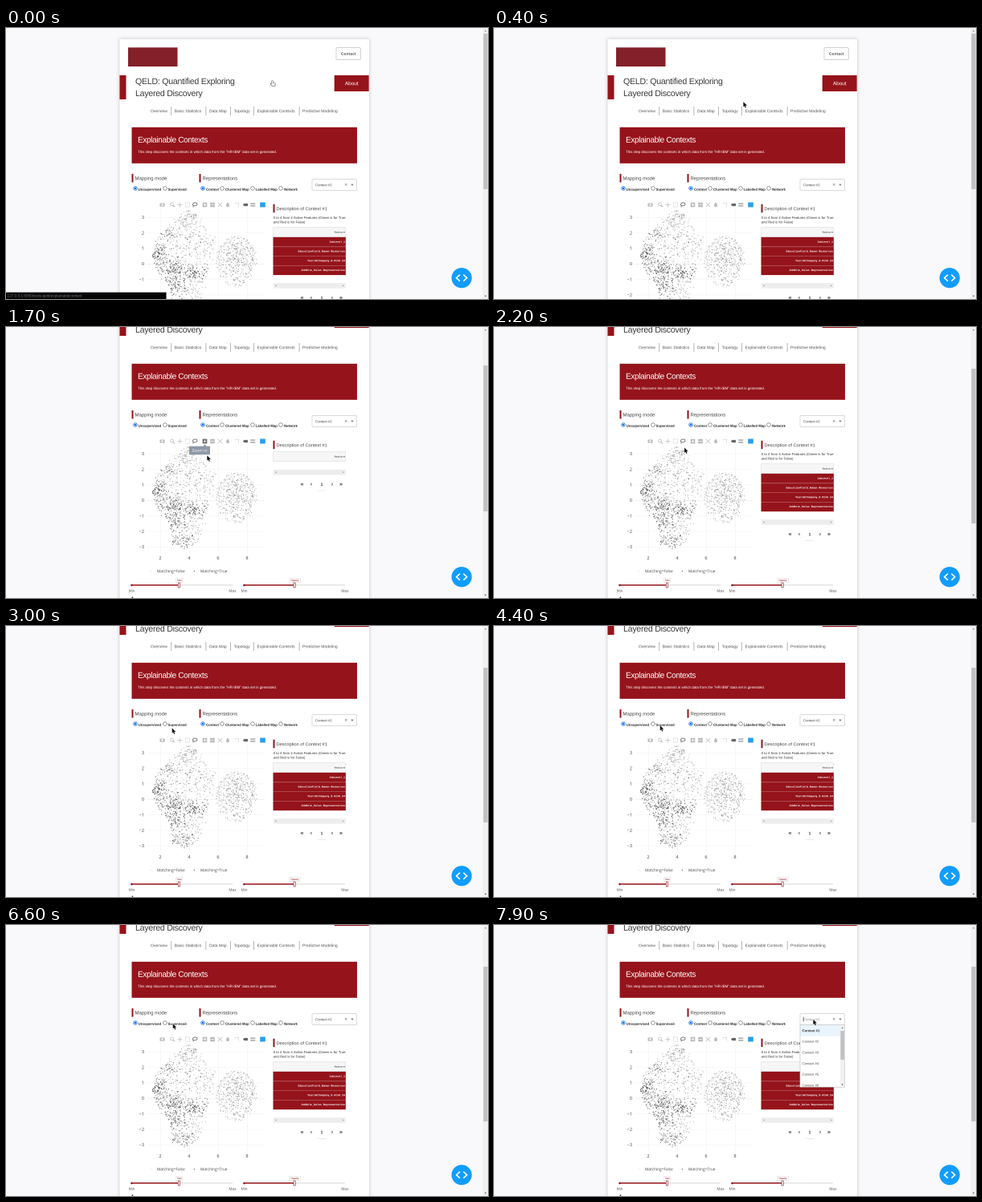
Recreate the animation shown at these times as an HTML page with a canvas. Size 600x338 px, loop 8000 ms.

```html
<!DOCTYPE html>
<html lang="en">
<head>
<meta charset="utf-8">
<title>Explainable Contexts</title>
<style>
html, body { margin: 0; width: 100%; height: 100%; overflow: hidden; background: #f9f8fa; }
canvas { display: block; width: 600px; height: 338px; }
</style>
</head>
<body>
<canvas id="stage"></canvas>
<script>
const W = 600, H = 338, LOOP = 8000, STEP = 100;
const RED = '#95131a', INK = '#444', GREY = '#bbb', PAGE = '#f9f8fa';
const SANS = '"Liberation Sans", Arial, sans-serif';
const OPEN = '"Open Sans", sans-serif';
const MONO = '"Liberation Mono", monospace';

// Drawn large, then shrunk, so that tiny type keeps its true widths
const dpr = window.devicePixelRatio || 1;
const SCALE = 4 * dpr;
const view = document.getElementById('stage');
const big = document.createElement('canvas');
for (const [c, k] of [[view, dpr], [big, SCALE]]) {
  c.width = W * k;
  c.height = H * k;
}
const out = view.getContext('2d');
const g = big.getContext('2d');
out.imageSmoothingQuality = 'high';

function box(x, y, w, h, fill, stroke, r = 0) {
  g.beginPath();
  g.roundRect(x, y, w, h, r);
  if (fill) { g.fillStyle = fill; g.fill(); }
  if (stroke) { g.strokeStyle = stroke; g.lineWidth = 0.6; g.stroke(); }
}

function text(s, x, y, size, color = INK, o = {}) {
  g.font = `${o.weight || 400} ${size}px ${o.font || SANS}`;
  g.letterSpacing = (o.gap || 0) + 'px';
  g.textAlign = o.align || 'left';
  g.fillStyle = color;
  g.fillText(s, x, y);
  g.letterSpacing = '0px';
}

function path(pts, color, width = 0.7) {
  g.beginPath();
  pts.forEach(([x, y], i) => i ? g.lineTo(x, y) : g.moveTo(x, y));
  g.strokeStyle = color;
  g.lineWidth = width;
  g.stroke();
}

function shape(pts, fill, stroke) {
  g.beginPath();
  pts.forEach(([x, y]) => g.lineTo(x, y));
  g.closePath();
  if (stroke) { g.strokeStyle = stroke; g.lineWidth = 0.9; g.lineJoin = 'round'; g.stroke(); }
  g.fillStyle = fill;
  g.fill();
}

function disc(x, y, r, fill, stroke) {
  g.beginPath();
  g.arc(x, y, r, 0, 7);
  if (fill) { g.fillStyle = fill; g.fill(); }
  if (stroke) { g.strokeStyle = stroke; g.lineWidth = 0.7; g.stroke(); }
}

// Triangle pointing along (dx, dy)
function tri(x, y, dx, dy, s, color) {
  shape([[x + dx * s, y + dy * s], [x - dx * s / 2 + dy * s, y - dy * s / 2 + dx * s],
    [x - dx * s / 2 - dy * s, y - dy * s / 2 - dx * s]], color);
}

// ---- scatter data ----
let seed = 20417;
function rnd() {
  seed = (seed + 0x6d2b79f5) | 0;
  let t = Math.imul(seed ^ (seed >>> 15), 1 | seed);
  t = (t + Math.imul(t ^ (t >>> 7), 61 | t)) ^ t;
  return ((t ^ (t >>> 14)) >>> 0) / 4294967296;
}
const gauss = () => rnd() + rnd() + rnd() + rnd() - 2;

const LEFT = [[181, 206], [187, 184], [210, 160], [225, 148], [241, 156], [248, 170], [263, 182],
  [260, 205], [251, 230], [248, 252], [238, 270], [220, 278], [204, 273], [205, 253], [194, 236], [183, 216]];
const RIGHT = [[261, 206], [267, 188], [282, 181], [297, 183], [310, 196], [313, 213], [304, 236],
  [287, 247], [271, 240], [262, 224]];

function inside(poly, x, y) {
  let hit = false;
  poly.forEach(([ax, ay], i) => {
    const [bx, by] = poly[(i + 1) % poly.length];
    if ((ay > y) !== (by > y) && x < (bx - ax) * (y - ay) / (by - ay) + ax) hit = !hit;
  });
  return hit;
}

const dots = [];
function scatter(poly, n, make, shade) {
  while (n > 0) {
    const [x, y] = make();
    if (!inside(poly, x, y)) continue;
    dots.push([x, y, shade * (0.6 + 0.6 * rnd())]);
    n--;
  }
}
const spread = (x, y, w, h) => () => [x + w * rnd(), y + h * rnd()];
const blob = (x, y, sx, sy) => () => [x + sx * gauss(), y + sy * gauss()];
scatter(LEFT, 360, spread(180, 147, 84, 132), 0.38);
scatter(RIGHT, 290, spread(260, 180, 54, 68), 0.34);
scatter(RIGHT, 160, blob(286, 208, 20, 20), 0.38);
[[190, 205, 9, 14, 95, 0.72], [207, 222, 14, 12, 110, 0.72], [234, 227, 14, 9, 95, 0.68],
 [212, 243, 14, 12, 90, 0.65], [219, 267, 15, 9, 75, 0.55], [226, 164, 15, 13, 80, 0.38],
 [203, 181, 16, 14, 65, 0.45], [238, 195, 16, 18, 45, 0.38]
].forEach(([x, y, sx, sy, n, a]) => scatter(LEFT, n, blob(x, y, sx, sy), a));

// ---- plot toolbar ----
const icons = {
  camera(x, y, c) { box(x - 3, y - 2, 6, 4.2, c, null, 0.7); disc(x, y, 1.2, '#fff'); },
  zoom(x, y, c) { disc(x - 0.6, y - 0.6, 1.9, null, c); path([[x + 0.8, y + 0.8], [x + 2.8, y + 2.8]], c, 1.2); },
  pan(x, y, c) {
    path([[x - 3, y], [x + 3, y]], c);
    path([[x, y - 3], [x, y + 3]], c);
  },
  select(x, y, c) { g.setLineDash([1, 0.8]); box(x - 2.6, y - 2.6, 5.2, 5.2, null, c); g.setLineDash([]); },
  lasso(x, y, c) {
    g.beginPath();
    g.ellipse(x + 0.2, y - 0.6, 2.8, 1.9, -0.2, 0, 7);
    g.strokeStyle = c; g.lineWidth = 0.8; g.stroke();
    path([[x - 1.6, y + 0.8], [x - 2.2, y + 3]], c, 0.8);
  },
  plus(x, y, c) {
    icons.minus(x, y, c);
    path([[x, y - 1.7], [x, y + 1.7]], '#fff', 0.8);
  },
  minus(x, y, c) { box(x - 2.8, y - 2.8, 5.6, 5.6, c); path([[x - 1.7, y], [x + 1.7, y]], '#fff', 0.8); },
  auto(x, y, c) {
    path([[x - 2.8, y - 2.8], [x + 2.8, y + 2.8]], c);
    path([[x - 2.8, y + 2.8], [x + 2.8, y - 2.8]], c);
  },
  home(x, y, c) { tri(x, y - 0.8, 0, -1, 2.4, c); box(x - 1.7, y, 3.4, 2.5, c); },
  spike(x, y, c) {
    g.setLineDash([1, 0.8]);
    path([[x - 2.5, y - 2], [x + 2, y - 2], [x + 2, y + 3]], c);
    g.setLineDash([]);
  },
  tag(x, y, c) { shape([[x - 3, y], [x - 1.5, y - 1.6], [x + 3, y - 1.6], [x + 3, y + 1.6], [x - 1.5, y + 1.6]], c); },
  tags(x, y, c) { box(x - 3, y - 2.4, 6, 2, c); box(x - 3, y + 0.4, 6, 2, c); },
  badge(x, y) { box(x - 3.3, y - 3, 6.6, 6, '#2a9df0'); }
};
function toolbar(list, y, dark) {
  list.forEach(([name, x]) => icons[name](x, y, dark.includes(name) ? '#666' : GREY));
}
const FULL_BAR = [['camera', 194.5], ['zoom', 207], ['pan', 216.3], ['select', 226], ['lasso', 235], ['plus', 247.5],
  ['minus', 257], ['auto', 266.5], ['home', 276], ['spike', 287.5], ['tag', 298], ['tags', 307.3], ['badge', 319.5]];
const SHORT_BAR = [['camera', 244], ['zoom', 256.5], ['pan', 266], ['plus', 279], ['minus', 288], ['auto', 297.5],
  ['home', 306.7], ['badge', 319.5]];

// ---- page parts ----
function heading(s, x, y, size = 6) {
  box(x, y, 2, 10.5, RED);
  text(s, x + 4, y + 7.5, size);
}

function radio(s, x, tx, on) {
  disc(x, 200, 2.3, '#fff', on ? '#1a73e8' : '#777');
  if (on) disc(x, 200, 1.4, '#1a73e8');
  text(s, tx, 202.7, 4.3, '#222', { weight: 700 });
}

function header() {
  g.shadowColor = 'rgba(60,50,70,.28)';
  g.shadowBlur = 4 * SCALE;
  box(141.5, 14, 310.5, 700, '#fff');
  g.shadowBlur = 0;
  g.shadowColor = 'transparent';
  box(152, 24.3, 61.5, 23.7, '#84202a');
  box(411, 24.5, 30.5, 15, '#fff', '#b5b5b5', 1.5);
  text('Contact', 426.4, 33.8, 4.6, '#444', { weight: 700, align: 'center', gap: 0.25 });
  box(141.5, 59, 8, 30, RED);
  box(408.7, 59, 43, 20, RED);
  text('About', 430.2, 71.2, 6.4, '#fff', { align: 'center' });
  text('QELD: Quantified Exploring', 161, 70, 10.6, '#3c3c3c', { gap: -0.25 });
  text('Layered Discovery', 161, 85, 10.6, '#3c3c3c', { gap: -0.25 });
  [['Overview', 180], ['Basic Statistics', 209.7], ['Data Map', 253], ['Topology', 283.6],
    ['Explainable Contexts', 312.6], ['Predictive Modeling', 369]]
    .forEach(([s, x]) => text(s, x, 105.2, 5, '#555'));
  [205.5, 248.6, 279.4, 308.2, 364.8].forEach(x => box(x, 98, 0.6, 11, '#888'));
}

function controls() {
  box(156.5, 123.8, 280.5, 45, RED);
  text('Explainable Contexts', 164, 142.8, 10, '#fff', { gap: -0.35 });
  text('This step discovers the contexts in which data from the "HR-IBM" data set is generated.',
    164, 156, 4.48, '#fff');
  heading('Mapping mode', 156.5, 182);
  heading('Representations', 240.5, 182);
  radio('Unsupervised', 161, 164.7, true);
  radio('Supervised', 198, 201.5);
  radio('Context', 245, 249, true);
  radio('Clustered Map', 269, 273);
  radio('Labelled Map', 307, 310.6);
  radio('Network', 342, 346);
}

function picker(open) {
  box(381, 188.5, 55.5, 14, '#fff', '#c4c4c4', 1.2);
  text('Context #1', 385, 197.2, 4.3, open ? '#888' : '#444');
  path([[422, 194], [424.4, 196.6]], '#888', 0.6);
  path([[424.4, 194], [422, 196.6]], '#888', 0.6);
  tri(431, 195.4, 0, open ? -1 : 1, 1.6, '#777');
  if (!open) return;
  box(384.8, 192.5, 0.6, 6, '#222');
  box(381, 202.6, 55.5, 77.6, '#fff', '#bbb');
  g.save();
  g.beginPath();
  g.rect(381, 202.6, 55.5, 77.4);
  g.clip();
  box(381.4, 203, 49.6, 13.7, '#e9f4fd');
  for (let i = 0; i < 6; i++)
    text('Context #' + (i + 1), 383.5, 211.2 + i * 13.65, 4.3, i ? '#555' : '#333', { weight: i ? 400 : 700 });
  box(431, 203, 5.3, 77, '#f1f1f1');
  box(431.4, 210, 4.5, 36, '#c1c1c1');
  tri(433.6, 206.4, 0, -1, 1.1, '#666');
  tri(433.6, 277, 0, 1, 1.1, '#444');
  g.restore();
}

function emptyPlot() {
  toolbar(SHORT_BAR, 220.7, ['zoom']);
  for (let i = 0; i < 4; i++) {
    const y = 255 + i * 21.3;
    box(190, y, 133, 0.5, '#f3f3f3');
    box(233 + i * 30, 255, 0.5, 100, '#eee');
    text(4 - i, 187.5, y + 2.2, 6, INK, { font: OPEN, align: 'right' });
  }
  box(202.6, 255, 0.9, 100, '#888');
}

// From here on, parts are placed in the coordinates of the scrolled view
function plot(hover) {
  toolbar(FULL_BAR, 142.5, hover ? ['lasso', 'plus', 'tag'] : ['lasso', 'tag']);
  for (let v = 3; v >= -3; v--) {
    const y = 216 - v * 19.33;
    box(176, y, 146, 0.5, v ? '#f2f2f2' : '#e6e6e6');
    text(String(v).replace('-', '\u2212'), 172, y + 2.1, 5.6, INK, { font: OPEN, align: 'right' });
  }
  for (let v = 2; v <= 8; v += 2) {
    const x = 156 + v * 18;
    box(x, 148, 0.5, 134, '#f0f0f0');
    text(v, x, 290, 5.6, INK, { font: OPEN, align: 'center' });
  }
  for (const [x, y, a] of dots) disc(x, y, 0.58, `rgba(25,25,25,${a})`);
  disc(180, 304.5, 0.4, '#aaa');
  disc(234.3, 304.5, 0.6, '#444');
  text('Matching=False', 188, 306.3, 4.8, INK, { font: OPEN });
  text('Matching=True', 242, 306.3, 4.8, INK, { font: OPEN });
  if (hover) {
    tri(247.5, 148, 0, -1, 2, '#8e98a8');
    box(228, 148.7, 26, 10.5, '#8e98a8', null, 0.8);
    text('Zoom in', 241, 155.8, 5, '#fff', { font: OPEN, align: 'center' });
  }
}

function slider(x, knob, label, w) {
  box(x, 321.3, 125.5, 1.2, '#ddd');
  box(x, 321.2, knob - x, 1.5, RED);
  disc(x, 322, 1.3, RED);
  box(knob - 1, 319, 2.2, 6, '#fff', RED);
  box(knob + 0.5 - w / 2, 313.4, w, 5, '#fff', '#ddd');
  text(label, knob + 0.5, 317, 3, RED, { align: 'center' });
  text('Min', x, 330.8, 4.9, '#666', { align: 'center' });
  text('Max', x + 125.5, 330.8, 4.9, '#666', { align: 'center' });
}

function details(loaded) {
  heading('Description of Context #1', 332.5, 141.7, 5.65);
  let y = 155.6;
  if (loaded) {
    text('0 to 4 from 4 Active Features (Green is for True', 332.7, 160, 4.29, '#333');
    text('and Red is for False)', 332.7, 165.5, 4.29, '#333');
    y = 170.6;
  }
  box(332.7, y, 90, 12, '#f6f6f6', '#ddd');
  const cell = (s, cy, c, weight) => text(s, 422, cy, 3.25, c, { font: MONO, align: 'right', weight });
  cell('feature', y + 7.1, '#222');
  y += 12.3;
  if (loaded) {
    ['JobLevel_1', 'EducationField_Human Resources', 'YearsAtCompany_0.0to6.24', 'JobRole_Sales Representative']
      .forEach((s, i) => {
        const ry = y + i * 11.8;
        box(332.5, ry, 90.4, 11.8, RED);
        if (i) box(332.5, ry, 90.4, 0.4, '#cf9a9c');
        cell(s, ry + 6.8, '#fff', 700);
      });
    y += 47.2;
  }
  y += 10;
  box(332.7, y, 90, 6.6, '#ededed');
  tri(336, y + 3.3, -1, 0, 1.1, '#999');
  tri(419.5, y + 3.3, 1, 0, 1.1, '#999');
  y += 18.4;
  [['\u00ab', 368.5], ['\u2039', 380], ['1', 393], ['\u203a', 406], ['\u00bb', 417]]
    .forEach(([s, x]) => text(s, x, y + 1.8, s === '1' ? 5 : 7, '#333', { align: 'center', weight: 700 }));
  box(387.5, y + 7.5, 11, 0.4, '#ccc');
}

function frameParts(top, bottom) {
  box(593.7, 0, 6.3, H, '#f1f1f1');
  box(594.3, top, 5.2, bottom - top, '#c1c1c1');
  tri(596.9, 3.8, 0, -1, 1.2, '#777');
  tri(596.9, 334.3, 0, 1, 1.2, '#555');
  disc(567.2, 311.7, 12.6, '#119dff');
  path([[565, 307.7], [560.6, 311.7], [565, 315.7]], '#fff', 1.6);
  path([[569.4, 307.7], [573.8, 311.7], [569.4, 315.7]], '#fff', 1.6);
}

// ---- pointer ----
const TRACK = [[0, 331, 66], [100, 330, 69], [900, 268, 142], [1600, 249.8, 162.3], [1700, 250.3, 160.3],
  [1900, 250, 160], [2700, 209, 130], [3000, 206.7, 127.3], [3400, 206.7, 126.5], [4400, 206.7, 124],
  [6600, 207.7, 123], [6700, 207.7, 123], [7000, 300, 142], [7300, 460, 130], [7600, 397.5, 119], [7700, 397.3, 117.8]];

function pointerAt(t) {
  const i = TRACK.findIndex(k => k[0] > t);
  if (i < 0) return TRACK[TRACK.length - 1].slice(1);
  const [t0, x0, y0] = TRACK[i - 1], [t1, x1, y1] = TRACK[i];
  const u = (t - t0) / (t1 - t0), e = u * u * (3 - 2 * u);
  return [x0 + (x1 - x0) * e, y0 + (y1 - y0) * e];
}

function pointer(t) {
  const [x, y] = pointerAt(t);
  const at = pts => pts.map(([a, b]) => [x + a, y + b]);
  if (t < 200)
    shape(at([[0, 0], [1, 0], [1, 2.5], [4, 3.2], [3.7, 6.5], [0.4, 6.5], [-1.7, 3.8], [-1, 3.2], [0, 4]]), '#fff', '#333');
  else
    shape(at([[0, 0], [0, 6.4], [1.4, 5.1], [2.5, 7.5], [3.6, 7], [2.6, 4.7], [4.6, 4.6]]), '#111', '#fff');
}

function draw(t) {
  const blank = t >= 500 && t < 1700;
  const loaded = t < 500 || t >= 1900;
  const scroll = t >= 1700 ? 78 : 0;
  g.setTransform(SCALE, 0, 0, SCALE, 0, 0);
  box(0, 0, W, H, PAGE);

  g.save();
  g.translate(0, -scroll);
  header();
  controls();
  if (blank) emptyPlot();
  else {
    g.save();
    g.translate(0, 78);
    plot(t >= 1700 && t < 2000);
    details(loaded);
    slider(156.5, 215.3, 'Size', 8);
    slider(296.5, 359, 'Opacity', 14);
    box(156.6, 336.6, 1.6, 1.4, '#333');
    g.restore();
  }
  picker(t >= 7700);
  g.restore();

  if (!scroll) frameParts(7, 201);
  else if (loaded) frameParts(52, 245);
  else frameParts(48, 230);
  if (t < 300) {
    box(0, 329.7, 199.5, 8.3, '#050505');
    text('127.0.0.1:8050/tools-qeld/explainablecontext', 1.5, 335.5, 4.7, '#777');
  }
  pointer(t);
  out.drawImage(big, 0, 0, view.width, view.height);
}

let shown = -1;
function tick(now) {
  const t = Math.floor(now % LOOP / STEP) * STEP;
  if (t !== shown) draw(shown = t);
  requestAnimationFrame(tick);
}
requestAnimationFrame(tick);
</script>
</body>
</html>
```
